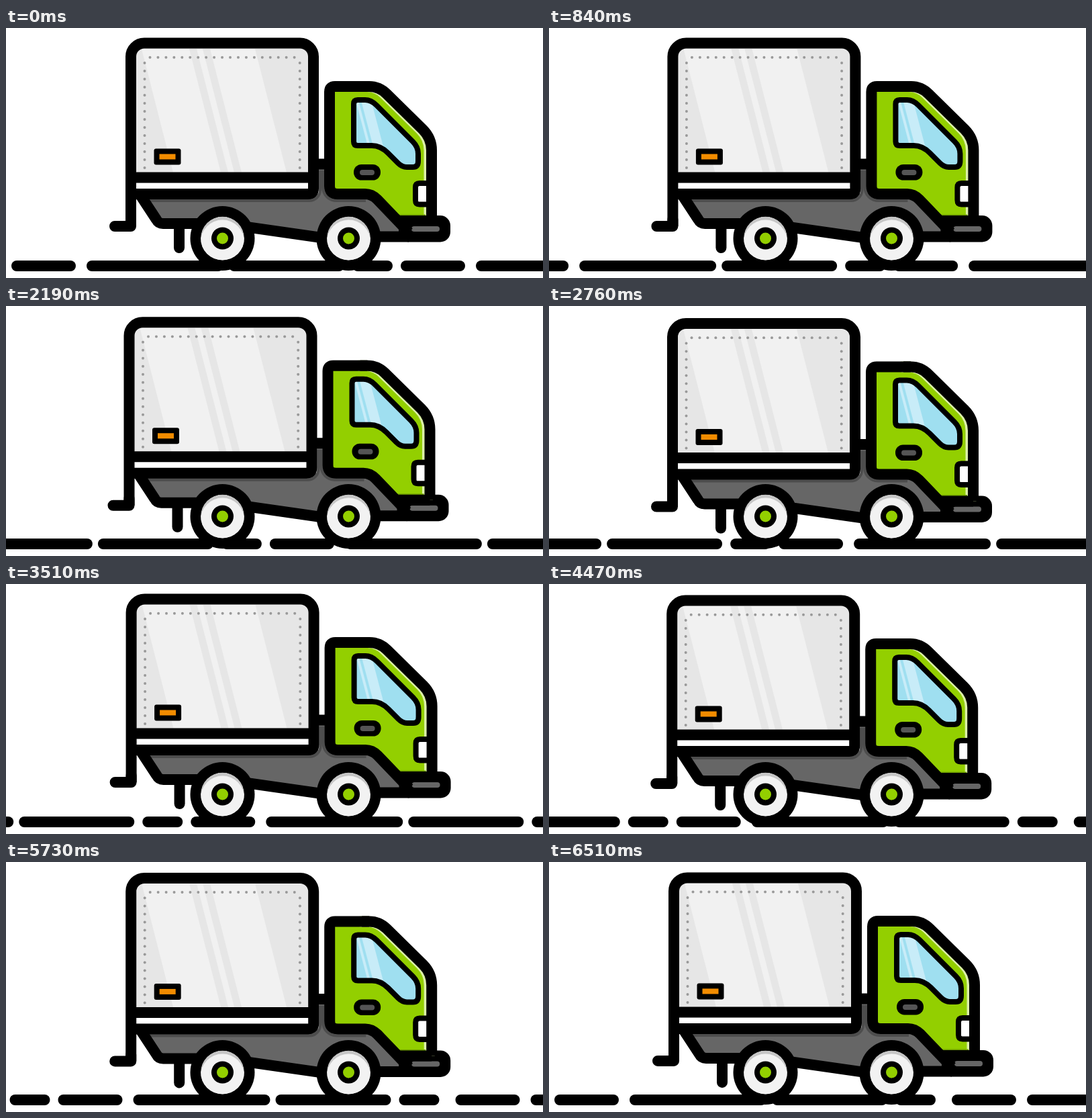
An HTML page that plays this animation: 800 px wide and 372 px high, repeating every 6540 ms.

```html
<!DOCTYPE html>
<html lang="en">
<head>
<meta charset="utf-8">
<title>Delivery truck</title>
<style>
  html, body { margin: 0; width: 100%; height: 100%; overflow: hidden; background: #fff; }
  svg { display: block; width: 100%; height: 100%; }
  .line { fill: none; stroke: #000; stroke-width: 16; stroke-linejoin: round; }
  .round { stroke-linecap: round; }
</style>
</head>
<body>
<svg viewBox="0 0 800 372">
  <defs>
    <clipPath id="rim"><circle r="32.5"/></clipPath>
    <clipPath id="panel"><rect x="190" y="26" width="264" height="192" rx="14"/></clipPath>
    <path id="glass" d="M524 107H535Q544 107 552 115L606 169Q614 177 614 187V198Q614 207 606 207H597Q590 207 584 201L569 186Q558 175 545 175H524Q518 175 518 169V113Q518 107 524 107Z"/>
    <clipPath id="pane"><use href="#glass"/></clipPath>
    <path id="roof" d="M530 87H541Q556 87 567 98L621 151Q634 164 634 182V287"/>
    <g id="wheel">
      <circle r="48"/>
      <g clip-path="url(#rim)">
        <circle r="32.5" fill="#c6c6c6"/>
        <circle cy="5" r="32.5" fill="#f2f2f2"/>
      </g>
      <circle r="16.5"/>
      <circle r="8.5" fill="#93cf00"/>
    </g>
  </defs>

  <g id="road"></g>

  <g id="body">
    <!-- chassis -->
    <path class="line round" d="M258 292V327"/>
    <path d="M466 203H482V250H553L605 310H555L470 312L365 297L322 291H232Q226 291 222 285L201 247H466Z" fill="#666"/>
    <path d="M206 257H452A16 16 0 0 0 468 241V212M472 212V237A20 20 0 0 0 492 257H536" fill="none" stroke="#4d4d4d" stroke-width="4"/>
    <path class="line" d="M201 250L224 285Q227 291 234 291H322L365 297L470 312"/>
    <path class="line" d="M462 202.500H478M510 310.500H600"/>
    <rect x="585" y="279" width="77" height="39.500" rx="15"/>
    <rect x="604" y="295" width="42" height="8" rx="4" fill="#666"/>

    <!-- cargo box -->
    <path d="M186 247V42.500A20 20 0 0 1 206 22.500H438A20 20 0 0 1 458 42.500V247Z" fill="#fff"/>
    <g clip-path="url(#panel)">
      <rect x="186" y="22" width="272" height="200" fill="#e6e6e6"/>
      <g id="shine"></g>
    </g>
    <g id="stitches" fill="#999"></g>
    <path class="line" d="M186 222.500H458"/>
    <path class="line" d="M186 247H450Q458 247 458 239V42.500A20 20 0 0 0 438 22.500H206A20 20 0 0 0 186 42.500V295"/>
    <path class="line round" d="M186 285V295H162"/>
    <rect x="220.500" y="179.500" width="40" height="24" rx="3"/>
    <rect x="228.500" y="187.500" width="24" height="8" fill="#f28c00"/>

    <!-- cab -->
    <path d="M482 95Q482 87 490 87H541Q556 87 567 98L621 151Q634 164 634 182V287H585L553 255Q545 247 535 247H494Q482 247 482 235Z" fill="#93cf00"/>
    <use href="#roof" transform="translate(-3.500 0)" fill="none" stroke="#dcf0a8" stroke-width="16"/>
    <path d="M583 278.500H625" stroke="#6f9e00" stroke-width="2"/>
    <path d="M634 231H616Q610 231 610 237V256Q610 262.500 616 262.500H634" fill="#fff" stroke="#000" stroke-width="8"/>
    <path class="line" d="M634 287H585M600 304L553 255Q545 247 535 247H494Q482 247 482 235V95Q482 87 490 87H541"/>
    <use href="#roof" class="line"/>
    <use href="#glass" fill="#9fdff0"/>
    <path d="M520 104H524L544 180H540ZM528 104H543L563 180H548Z" fill="#c8ecf8" clip-path="url(#pane)"/>
    <use href="#glass" fill="none" stroke="#000" stroke-width="8"/>
    <rect x="518" y="203" width="40" height="23.500" rx="11.500"/>
    <rect x="527" y="211" width="22" height="8" rx="4" fill="#555"/>
  </g>

  <use href="#wheel" x="322.500" y="313"/>
  <use href="#wheel" x="510.500" y="313"/>
</svg>
<script>
const NS = "http://www.w3.org/2000/svg";
const LOOP = 6540, STEP = 30, TRAVEL = 580;
const byId = id => document.getElementById(id);
const road = byId("road"), body = byId("body");

function add(parent, tag, attrs) {
  const node = document.createElementNS(NS, tag);
  for (const key in attrs) node.setAttribute(key, attrs[key]);
  parent.appendChild(node);
}

// Road: one group of dashes, laid three times; the last starts after a wider gap
const dashes = [[96, 16], [204, 8], [172, 12], [60, 12]];
for (const groupStart of [8, 588, 1180]) {
  let x = groupStart;
  for (const [width, gap] of dashes) {
    add(road, "rect", { x, y: 346, width, height: 16, rx: 8 });
    x += width + gap;
  }
}

// Slanted reflections on the cargo panel: left and right edge at the top
for (const [a, b] of [[202, 273], [284, 293], [304, 371]]) {
  add(byId("shine"), "path", { d: `M${a} 31H${b}L${b + 48} 219H${a + 48}Z`, fill: "#f1f1f1" });
}

const dot = (cx, cy) => add(byId("stitches"), "circle", { cx, cy, r: 2 });
for (let i = 0; i < 19; i++) dot(214.5 + i * 11.95, 43.7);
for (let i = 0; i < 14; i++) {
  dot(206.5, 52 + i * 12);
  dot(437.7, 52 + i * 12);
}

// Suspension sway eases between a few poses: time, dx, dy
const poses = [
  [0, 0, 0], [1620, -3, 0], [2760, -2, 3.5], [3510, 0.6, 0],
  [4470, -2.8, 2], [5730, 0.2, 1.4], [LOOP, 0, 0.9]
];

function swayAt(t) {
  const i = poses.findIndex(pose => pose[0] > t);
  const [t0, x0, y0] = poses[i - 1], [t1, x1, y1] = poses[i];
  const k = (1 - Math.cos(Math.PI * (t - t0) / (t1 - t0))) / 2;
  return [x0 + (x1 - x0) * k, y0 + (y1 - y0) * k];
}

function draw(time) {
  const t = Math.floor((time % LOOP) / STEP) * STEP;
  road.setAttribute("transform", `translate(${-TRAVEL * t / (LOOP - STEP)} 0)`);
  body.setAttribute("transform", `translate(${swayAt(t).join(" ")})`);
}

const start = performance.now();
function tick() {
  draw(performance.now() - start);
  requestAnimationFrame(tick);
}
tick();
</script>
</body>
</html>
```
